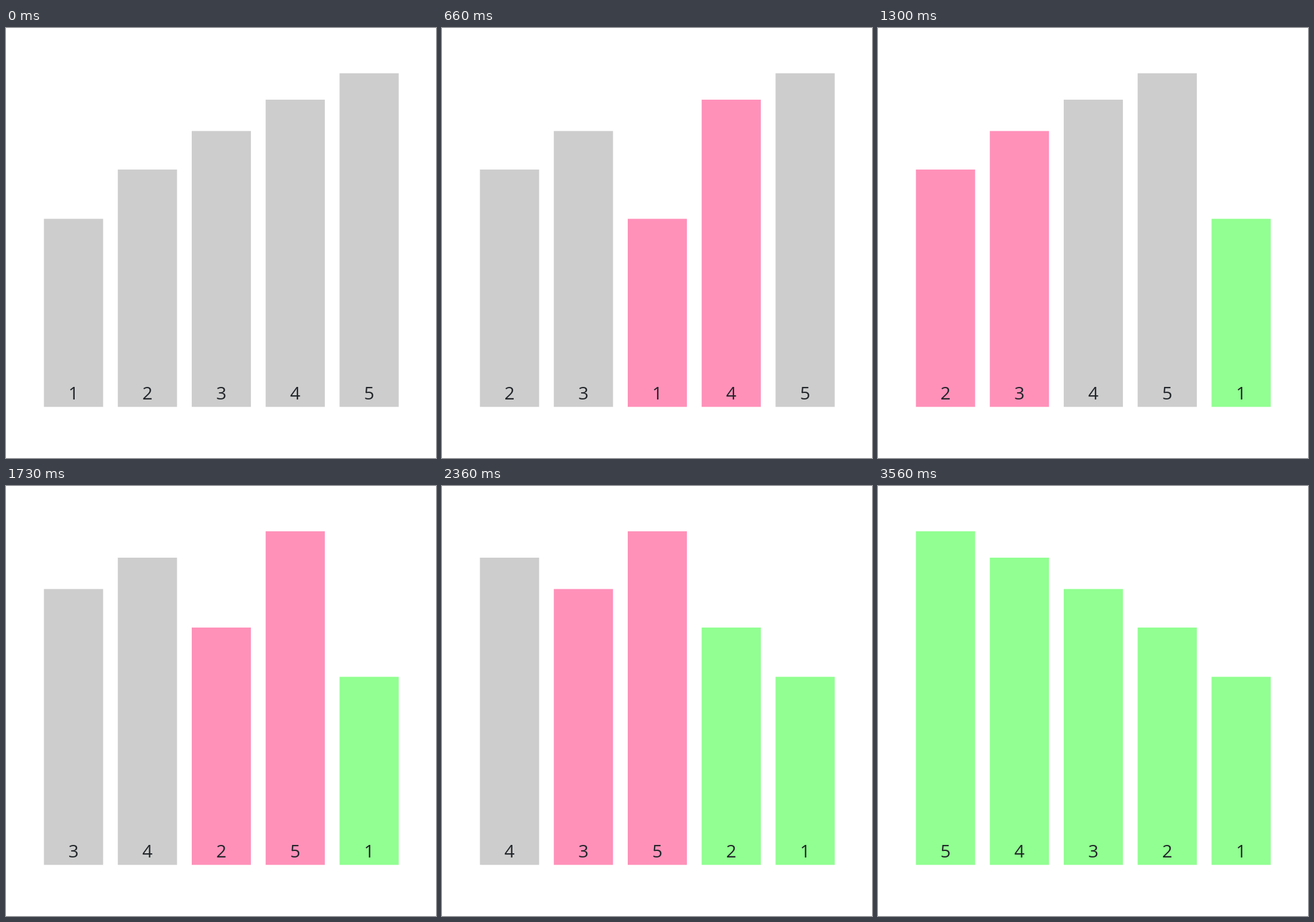
An HTML page with a canvas for the animation above (3660 ms loop, 720x720 px).

```html
<!DOCTYPE html>
<html lang="en">
<head>
<meta charset="utf-8">
<title>Bubble sort</title>
<style>
  html, body { margin: 0; width: 100%; height: 100%; overflow: hidden; background: #fff; }
  canvas { display: block; }
</style>
</head>
<body>
<canvas id="stage" width="720" height="720"></canvas>
<script>
const ctx = document.getElementById('stage').getContext('2d');
const LOOP = 3660;
const GRAY = '#cdcdcd', PINK = '#ff91b9', GREEN = '#91ff91', INK = '#212529';
const TOPS = [319.5, 237, 172.5, 120, 75.8];
const LEFT = 63.5, PITCH = 123.75, WIDTH = 99.1, BOTTOM = 634.4;

// Moments at which the sort advances by one step.
const STEP_TIMES = [260, 500, 660, 900, 1100, 1300, 1530, 1730, 1930, 2130, 2360, 2560, 2760, 2960, 3200];

// Descending bubble sort: one state per compared pair, one after each pass.
function buildStates() {
  const order = [1, 2, 3, 4, 5];
  const states = [];
  const save = (sorted, pair = -1) => states.push({ order: [...order], sorted, pair });
  save(5);
  for (let end = 4; end > 0; end--) {
    for (let j = 0; j < end; j++) {
      save(end + 1, j);
      if (order[j] < order[j + 1]) [order[j], order[j + 1]] = [order[j + 1], order[j]];
    }
    save(end);
  }
  save(0);
  return states;
}

const states = buildStates();

function barColor({ sorted, pair }, i) {
  if (i >= sorted) return GREEN;
  return pair >= 0 && (i === pair || i === pair + 1) ? PINK : GRAY;
}

function draw(time) {
  const state = states[STEP_TIMES.filter(t => t <= time + 2).length];
  ctx.fillStyle = '#fff';
  ctx.fillRect(0, 0, 720, 720);
  ctx.font = '30px "Open Sans", "Noto Sans", sans-serif';
  ctx.textAlign = 'center';
  state.order.forEach((value, i) => {
    const x = LEFT + i * PITCH, top = TOPS[value - 1];
    ctx.fillStyle = barColor(state, i);
    ctx.fillRect(x, top, WIDTH, BOTTOM - top);
    ctx.fillStyle = INK;
    ctx.fillText(value, x + WIDTH / 2, 622);
  });
}

function tick() {
  draw(performance.now() % LOOP);
  requestAnimationFrame(tick);
}
tick();
</script>
</body>
</html>
```
